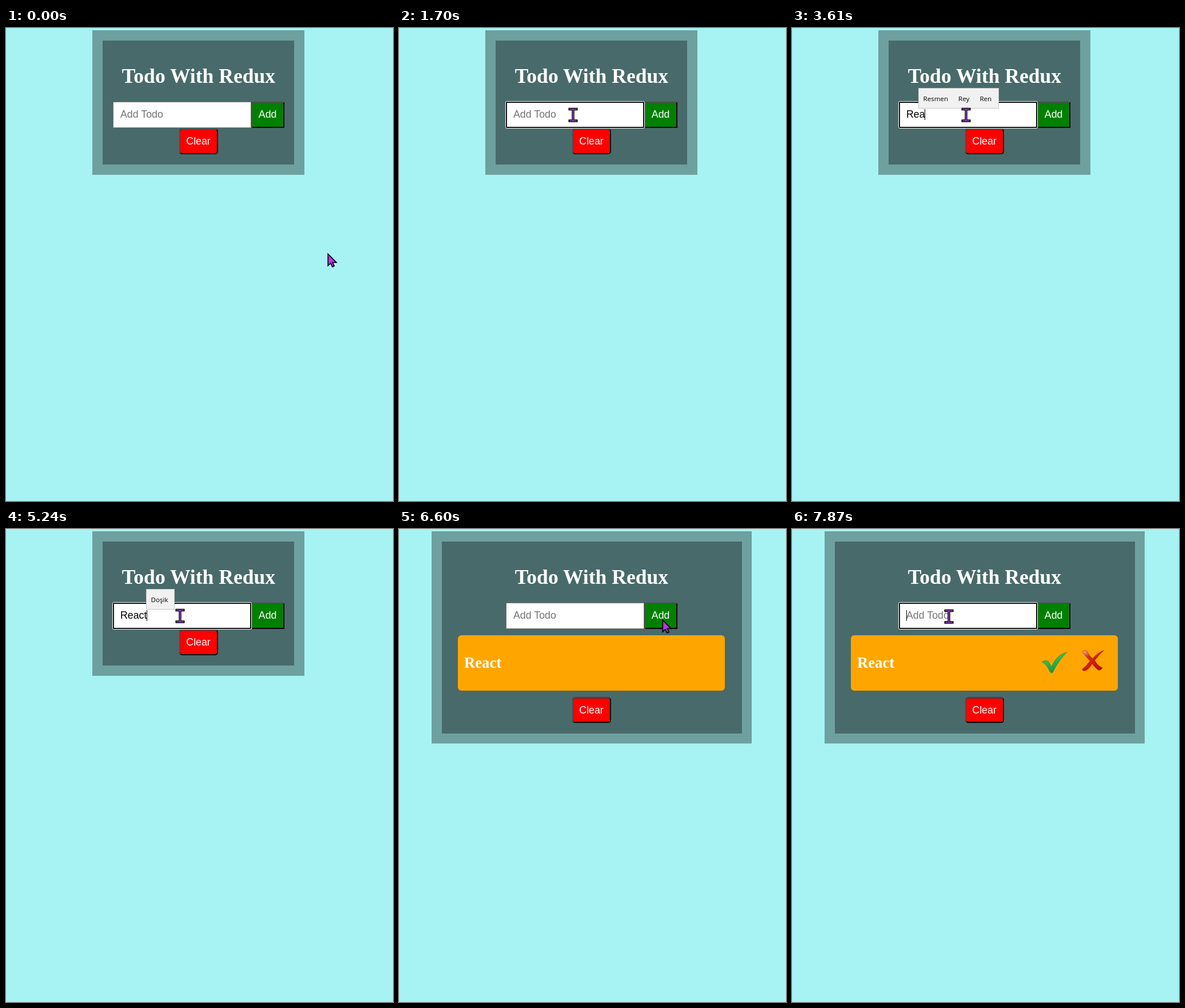
These frames come from a looping animation (677 px wide and 828 px high, 8000 ms). An HTML page:

```html
<!DOCTYPE html>
<html lang="en">
<head>
<meta charset="utf-8">
<title>Todo</title>
<style>
  html, body { margin: 0; width: 100%; height: 100%; overflow: hidden; background: #a7f3f3; }
  svg { display: block; }
  text { white-space: pre; }
  .ui { font: 17.8px "Liberation Sans", Arial, sans-serif; }
  .serif { font-family: "Liberation Serif", "Times New Roman", serif; font-weight: bold; fill: #fff; }
  .hint { font: 11.6px "Open Sans", "Noto Sans", sans-serif; }
  .edge { fill: none; stroke-width: 2; }
</style>
</head>
<body>
<svg width="677" height="828" viewBox="0 0 677 828">
  <defs>
    <linearGradient id="green" x1="0" y1="0" x2="0.4" y2="1">
      <stop offset="0" stop-color="#8fe0a0"/>
      <stop offset="0.4" stop-color="#33bd55"/>
      <stop offset="1" stop-color="#169a3c"/>
    </linearGradient>
    <linearGradient id="red" x1="0" y1="0" x2="0.7" y2="1">
      <stop offset="0" stop-color="#f3c0b4"/>
      <stop offset="0.35" stop-color="#d62a1c"/>
      <stop offset="1" stop-color="#c00c06"/>
    </linearGradient>
  </defs>

  <rect width="677" height="828" fill="#a7f3f3"/>
  <rect id="outer" y="4" fill="#6ea0a0"/>
  <rect id="inner" y="22" fill="#496a6a"/>
  <text class="serif" x="337" y="96" font-size="35.6" text-anchor="middle">Todo With Redux</text>

  <rect id="field" x="187.5" y="129.5" width="241" height="45" fill="#fff"/>
  <g id="add">
    <rect x="430" y="130" width="56" height="44" fill="#008000"/>
    <path id="addLow" class="edge" d="M430 174H486V130"/>
    <path id="addHigh" class="edge" d="M430 175V130H486"/>
    <text class="ui" x="441.8" y="157" fill="#fff">Add</text>
  </g>
  <g id="ring" fill="none">
    <rect x="186.5" y="128.5" width="243" height="47" rx="2" stroke="#fff"/>
    <rect x="188" y="130" width="240" height="44" rx="1" stroke="#101010" stroke-width="2"/>
  </g>
  <text id="value" class="ui" x="200" y="157"></text>
  <rect id="caret" y="142" width="1" height="19"/>

  <g id="item">
    <rect x="103" y="186" width="467" height="97" rx="6" fill="#ffa500"/>
    <text class="serif" x="114" y="243" font-size="26.7">React</text>
    <g id="icons" stroke-linejoin="round">
      <path fill="url(#green)" stroke="#1c8a3c" stroke-width="0.8"
        d="M437.500 233C441 229.500 447 230 449 233Q452 237 453.500 242C459 229 468 219 480.500 216C470 226 462 239 456 251Q453.500 253.500 451.500 250C447 241 444 236 437.500 233Z"/>
      <path fill="url(#red)" stroke="#a30d08" stroke-width="0.6"
        d="M508 215Q512 211 516 214Q520 222 525.500 227Q534 217 545.500 212.500Q536 221 529.500 230Q535 240 543 243Q540 248 536 247Q530 243 525 235.500Q520 245 513 248Q509 249 507.500 246Q516 239 521.500 231Q514 223 508 215Z"/>
    </g>
  </g>

  <g id="clear">
    <rect x="304" y="177" width="66" height="43" rx="4" fill="#f00" stroke="#000" stroke-width="2"/>
    <path class="edge" stroke="#4c4c4c" d="M305 219Q304 218 304 216V181Q304 177 308 177H366Q368 177 369 178"/>
    <text class="ui" x="315.300" y="204" fill="#fff">Clear</text>
  </g>

  <g id="popup">
    <rect id="popupBox" y="105.500" height="35" fill="#f1f1f1" stroke="#c8c8c8"/>
    <text id="words" class="hint" y="128"></text>
  </g>

  <g id="arrow">
    <path d="M.8 1.500V22L5.500 17.700L8.500 24L11.700 22.500L8.800 16.300H15.500Z"
      fill="#bd33f0" stroke="#000" stroke-width="1.700"/>
  </g>
  <g id="beam" fill="none">
    <path d="M-8 -10H8M-8 10.500H8M0 -10V10.500" stroke="#000" stroke-width="4.400"/>
    <path d="M-6.500 -10H6.500M-6.500 10.500H6.500M0 -10V10.500" stroke="#a94be0" stroke-width="1.700"/>
  </g>
  <circle id="press" r="16" fill="#ff0" fill-opacity="0.48"/>
</svg>
<script>
const LOOP = 8000;
const $ = id => document.getElementById(id);
const set = (id, attrs) => {
  for (const k in attrs) $(id).setAttribute(k, attrs[k]);
};
const show = (id, on) => set(id, { visibility: on ? 'visible' : 'hidden' });
const within = (t, spans) => spans.some(([a, b]) => t >= a && t < b);

// start, end, steps, waypoints
const moves = [
  [90, 720, 8, [[563, 394], [506, 306], [452, 206], [390, 172], [318, 152]]],
  [1520, 1520, 1, [[318, 152], [304, 152]]],
  [5500, 6230, 9, [[304, 152], [366, 173], [424, 184], [466, 184], [461, 158]]],
  [6960, 7690, 9, [[461, 158], [435, 158], [340, 155], [274, 153]]]
];
const typed = [[0, ''], [2880, 'R'], [3250, 'Re'], [3610, 'Rea'],
  [4420, 'Reac'], [4870, 'React'], [6600, '']];
const blinks = [1170, 1700, 2240, 2690, 2880, 4150, 4420, 5500, 6050, 6410, 7800];
const clicks = [[980, 1170], [6410, 6600], [7800, 7870]];
const focus = [[1080, 6410], [7800, LOOP]];
// start, end, left, width, suggestions
const hints = [
  [3060, 3340, 212, 160, ['Resmen', 'Renkli', 'Rahat']],
  [3430, 3790, 222, 140, ['Resmen', 'Rey', 'Ren']],
  [4420, 4500, 231, 114, ['Reaksiyon', 'Rey']],
  [4500, 5240, 241, 82, ['Renk', 'Ret']],
  [5240, 6410, 246, 49, ['Doşik']]
];

function along(pts, u) {
  const s = u * (pts.length - 1);
  const i = Math.min(Math.floor(s), pts.length - 2);
  return pts[i].map((v, k) => v + (pts[i + 1][k] - v) * (s - i));
}

function pointer(t) {
  let pos = moves[0][3][0];
  for (const [start, end, steps, pts] of moves) {
    if (t < start) break;
    const gap = steps > 1 ? (end - start) / (steps - 1) : 1;
    const k = Math.min(steps, Math.floor((t - start) / gap + 0.001) + 1);
    pos = along(pts, k / steps);
  }
  return pos.map(Math.round);
}

function drawPanel(t) {
  const full = t >= 6600;
  set('outer', full ? { x: 57, width: 560, height: 371.5 } : { x: 151, width: 371, height: 253 });
  set('inner', full ? { x: 75, width: 525, height: 336 } : { x: 169, width: 335, height: 217 });
  set('clear', { transform: `translate(0 ${full ? 118.5 : 0})` });
  show('item', full);
  show('icons', t >= 6960);

  const down = within(t, [clicks[1]]);
  set('addLow', { stroke: down ? '#4c4c4c' : '#000' });
  set('addHigh', { stroke: down ? '#000' : '#4c4c4c' });
}

function drawField(t, hover) {
  const text = typed.filter(e => e[0] <= t).pop()[1];
  const value = $('value');
  value.textContent = text || 'Add Todo';
  set('value', { fill: text ? '#000' : '#757575' });
  set('field', { stroke: hover ? '#4f4f4f' : '#767676' });
  show('ring', within(t, focus));

  const end = text ? value.getComputedTextLength() : 0;
  set('caret', { x: Math.floor(200 + end) });
  show('caret', blinks.filter(b => b <= t).length % 2 === 1);
}

function drawHints(t) {
  const hint = hints.find(h => within(t, [h]));
  show('popup', hint);
  if (!hint) return;
  const [, , x, width, list] = hint;
  set('popupBox', { x: x - 0.5, width });
  set('words', { x: x + 7.5 });
  $('words').innerHTML = list.map((w, i) => `<tspan dx="${i ? 18 : 0}">${w}</tspan>`).join('');
}

function draw(t) {
  const [x, y] = pointer(t);
  const hover = x >= 187 && x < 429 && y >= 129 && y < 175;
  drawPanel(t);
  drawField(t, hover);
  drawHints(t);
  set('arrow', { transform: `translate(${x - 0.5} ${y})` });
  set('beam', { transform: `translate(${x + 0.5} ${y})` });
  show('arrow', !hover);
  show('beam', hover);
  set('press', { cx: x - 1, cy: y - 1 });
  show('press', within(t, clicks));
}

const begin = performance.now();
function tick() {
  draw((performance.now() - begin) % LOOP);
  requestAnimationFrame(tick);
}
tick();
</script>
</body>
</html>
```
